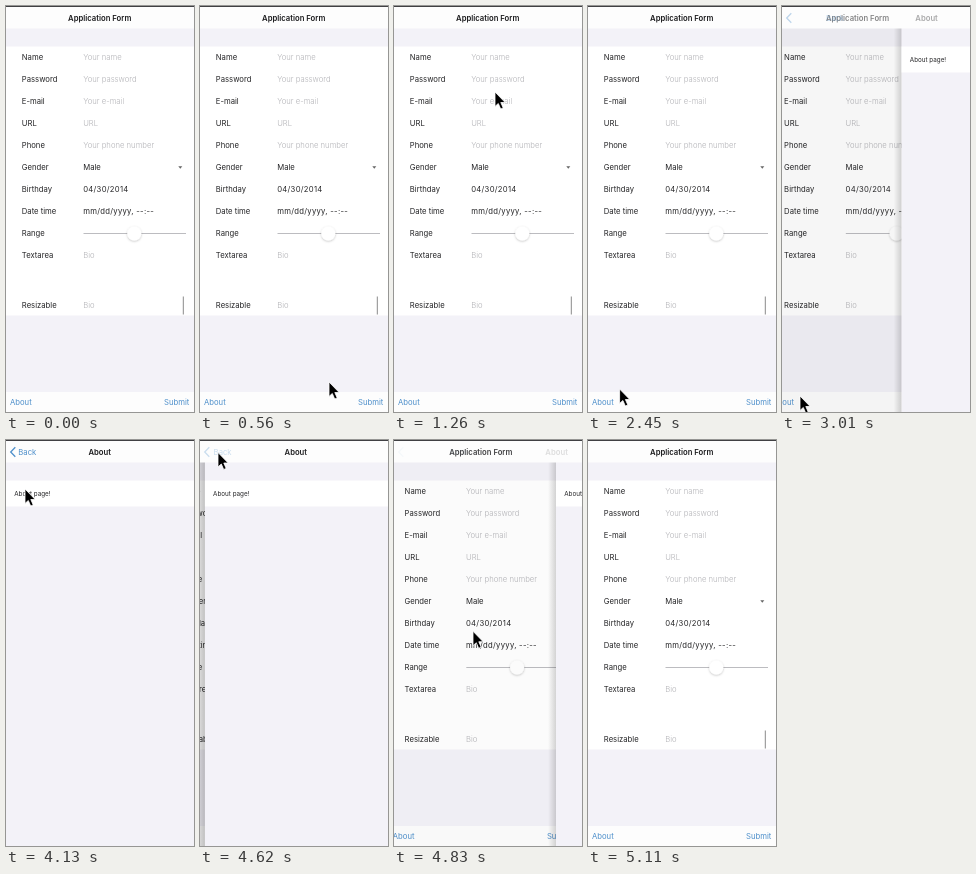
Animation, 188 px wide and 406 px high, one loop 5250 ms. Source, as an HTML page:

```html
<!DOCTYPE html>
<html lang="en">
<head>
<meta charset="utf-8">
<title>Application Form</title>
<style>
  html, body { margin: 0; width: 100%; height: 100%; overflow: hidden; background: #fff; }
  svg { display: block; width: 100%; height: 100%; font: 7.7px Inter, sans-serif; fill: #262628; }
  .hint { fill: #b4b4b8; font-weight: 300; }
  .date { letter-spacing: .28px; }
  .link { fill: #4f90cb; }
  .title { fill: #1c1c1e; font-weight: 600; text-anchor: middle; }
</style>
</head>
<body>
<svg viewBox="0 0 188 406">
  <defs>
    <linearGradient id="edge">
      <stop offset="0" stop-opacity="0"/>
      <stop offset="1" stop-opacity=".16"/>
    </linearGradient>
    <filter id="soft" x="-50%" y="-50%" width="200%" height="200%">
      <feDropShadow dx="0" dy=".8" stdDeviation=".8" flood-opacity=".25"/>
    </filter>
  </defs>

  <g id="form">
    <rect width="188" height="406" fill="#f3f2f8"/>
    <rect y="40.5" width="188" height="269" fill="#fff"/>
    <g id="rows"></g>
    <path d="M172.3 160.2h4l-2 2.6z" fill="#666"/>
    <path d="M77.5 227.5H180" stroke="#bcbcc0"/>
    <circle cx="128.3" cy="227.5" r="7" fill="#fff" filter="url(#soft)"/>
    <path d="M177.3 290.5v18" stroke="#8a8a8a"/>
    <rect y="386" width="188" height="20" fill="#fdfdfd"/>
    <text id="aboutLink" class="link" x="4" y="398.8">About</text>
    <text class="link" x="183.4" y="398.8" text-anchor="end">Submit</text>
  </g>
  <rect id="shade" width="188" height="406" fill="#000"/>

  <g id="about">
    <rect x="-8" width="8" height="406" fill="url(#edge)"/>
    <rect width="188" height="406" fill="#f3f2f8"/>
    <rect y="40.5" width="188" height="26" fill="#fff"/>
    <text x="8.2" y="56" font-size="6.3">About page!</text>
  </g>

  <rect width="188" height="22.5" fill="#fdfdfd"/>
  <rect width="188" height=".9" fill="#2b2b2e"/>
  <text id="formTitle" class="title" x="93.7" y="14.8">Application Form</text>
  <text id="aboutTitle" class="title" x="93.7" y="14.8">About</text>
  <g id="back" class="link">
    <path d="M9.3 7.2L4.7 12l4.6 4.8" fill="none" stroke="#4f90cb" stroke-width="1.3"/>
    <text id="backText" x="12.3" y="14.8">Back</text>
  </g>

  <path id="cursor" d="M0 0V14.4L3.3 11.5L5.7 17L8.2 15.9L5.8 10.5H10.2Z" fill="#000" stroke="#fff" stroke-width=".8"/>
</svg>
<script>
const LOOP = 5250, STEP = 70;
const $ = id => document.getElementById(id);

// label, value, class of the value
const rows = [
  ['Name', 'Your name', 'hint'],
  ['Password', 'Your password', 'hint'],
  ['E-mail', 'Your e-mail', 'hint'],
  ['URL', 'URL', 'hint'],
  ['Phone', 'Your phone number', 'hint'],
  ['Gender', 'Male', ''],
  ['Birthday', '04/30/2014', 'date'],
  ['Date time', 'mm/dd/yyyy, --:--', 'date'],
  ['Range', '', ''],
  ['Textarea', 'Bio', 'hint'],
  ['Resizable', 'Bio', 'hint'],
];
$('rows').innerHTML = rows.map(([label, value, kind], i) => {
  const y = i < 10 ? 54 + 22 * i : 302;
  return `<text x="15.8" y="${y}">${label}</text><text class="${kind}" x="77.2" y="${y}">${value}</text>`;
}).join('');

// cursor stops: time, x, y
const path = [
  [0, 148, 408], [70, 148, 408], [490, 129, 376], [770, 129, 376],
  [1050, 90, 170], [1190, 101, 86], [1330, 101, 86], [1750, 116, 290],
  [1890, 116, 290], [2310, 31.6, 383], [2450, 31.6, 383], [2660, 18, 390],
  [3010, 18, 390], [3220, 28, 402], [3290, 32, 412], [3780, 87, 412],
  [4130, 19, 49], [4340, 18, 22], [4480, 18, 12.5], [4690, 18, 12.5],
  [4970, 140, 370], [5040, 148, 408], [LOOP, 148, 408],
];

const clamp = x => Math.min(1, Math.max(0, x));
const smooth = x => x * x * (3 - 2 * x);
const bezier = (u, a, b) => 3 * u * (1 - u) ** 2 * a + 3 * u * u * (1 - u) * b + u ** 3;

// the CSS "ease" curve
function ease(x) {
  let lo = 0, hi = 1;
  for (let i = 0; i < 20; i++) {
    const mid = (lo + hi) / 2;
    if (bezier(mid, .25, .25) < x) lo = mid; else hi = mid;
  }
  return bezier(lo, .1, 1);
}

function cursorAt(t) {
  const i = path.findIndex(stop => stop[0] > t);
  const [t0, x0, y0] = path[i - 1], [t1, x1, y1] = path[i];
  const k = smooth((t - t0) / (t1 - t0));
  return [x0 + (x1 - x0) * k, y0 + (y1 - y0) * k];
}

function place(id, x, opacity = 1, y = 0) {
  $(id).setAttribute('transform', `translate(${x} ${y})`);
  $(id).setAttribute('opacity', opacity);
}

function draw(t) {
  const open = ease(clamp((t - 2918) / 400)) - ease(clamp((t - 4603) / 400));
  const away = 1 - open;
  place('form', -37.6 * open);
  place('shade', 0, open * .1);
  place('about', open > .0001 ? 188 * away : 200);
  place('formTitle', -50 * open, clamp(1 - open * 1.3));
  place('aboutTitle', 80 * away, open);
  place('backText', 50 * away);
  place('back', 0, open * (t >= 4550 ? .3 : 1));
  place('aboutLink', 0, t >= 2730 && t < 3010 ? .3 : 1);
  const [x, y] = cursorAt(t);
  place('cursor', x, 1, y);
}

function tick() {
  const t = performance.now() % LOOP;
  draw(Math.floor(t / STEP) * STEP);
  requestAnimationFrame(tick);
}
tick();
</script>
</body>
</html>
```
